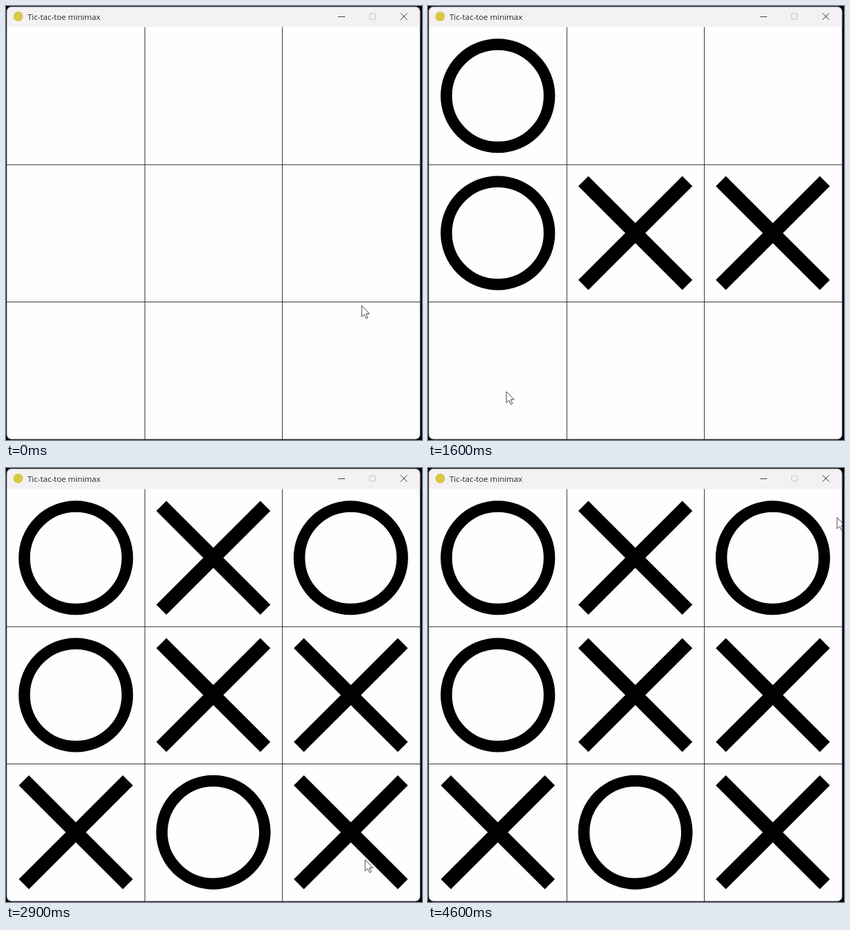
Recreate the animation shown at these times as an HTML page. Size 600x627 px, loop 4.7 s.

```html
<!DOCTYPE html>
<html lang="en">
<head>
<meta charset="utf-8">
<title>Tic-tac-toe minimax</title>
<style>
  html, body { margin: 0; width: 100%; height: 100%; overflow: hidden; background: #000; }
  svg { display: block; width: 100vw; height: 100vh; }
  text { font: 11.5px "Open Sans", "Noto Sans", sans-serif; fill: #262626; }
</style>
</head>
<body>
<svg viewBox="0 0 600 627">
  <defs>
    <clipPath id="frame"><rect x="1" y="1" width="596.3" height="625" rx="7"/></clipPath>
    <circle id="O" r="74.3" fill="none" stroke="#000" stroke-width="16.5"/>
    <path id="X" d="M-75-75 75 75M75-75-75 75" stroke="#000" stroke-width="20.5"/>
  </defs>
  <g clip-path="url(#frame)">
    <rect width="600" height="627" fill="#fefdff"/>
    <rect width="600" height="30.5" fill="#f3f1f4"/>
    <circle cx="17.5" cy="15" r="7" fill="#d9c845"/>
    <text x="31" y="19.6">Tic-tac-toe minimax</text>
    <g fill="none" stroke="#333">
      <path d="M479 15.5H489" stroke-width=".9"/>
      <rect x="524.5" y="11" width="8" height="8" rx="1" stroke="#c6c4c7"/>
      <path d="M569 10.3 578.6 19.9M578.6 10.3 569 19.9"/>
    </g>
    <g id="board"></g>
    <path id="cursor" d="M0 0V16.2L3.7 12.7 6.4 18.5 8.8 17.4 6.2 11.7H11.2Z"
          fill="#fff" stroke="#333" stroke-width=".9" stroke-linejoin="round"/>
  </g>
  <rect x="1" y="1" width="596.3" height="625" rx="7" fill="none" stroke="#555" stroke-width=".7"/>
</svg>
<script>
const LOOP = 4700, TICK = 100;
const LEFT = 2, TOP = 31, CELL = 198.3;

// Cells in playing order; X and O alternate, O answers one tick later.
const order = [4, 0, 5, 3, 6, 2, 1, 7, 8];
const clicks = [300, 1000, 1700, 2200, 2800];

// Pointer rests: arrival, departure, x, y
const rests = [
  [0, 0, 513, 433],
  [300, 400, 320, 346],
  [700, 1100, 508, 348],
  [1500, 1800, 113, 557],
  [2100, 2400, 301, 135],
  [2900, 3200, 518, 566],
  [3700, 4300, 578, 134],
  [4600, LOOP, 590, 71.5]
];

const board = document.getElementById('board');
const cursor = document.getElementById('cursor');

function add(tag, attrs) {
  const el = document.createElementNS('http://www.w3.org/2000/svg', tag);
  for (const key in attrs) el.setAttribute(key, attrs[key]);
  board.append(el);
  return el;
}

const shift = (x, y) => `translate(${x} ${y})`;
const smooth = u => u * u * (3 - 2 * u);

for (const i of [1, 2]) {
  const x = LEFT + CELL * i, y = TOP + CELL * i;
  add('path', { d: `M${x} 30.5V627M0 ${y}H600`, stroke: '#111', 'stroke-width': .85 });
}

const marks = order.map((cell, i) => {
  const x = LEFT + CELL * (cell % 3 + .498);
  const y = TOP + CELL * (Math.floor(cell / 3) + .498);
  return {
    el: add('use', { href: i % 2 ? '#O' : '#X', transform: shift(x, y) }),
    time: clicks[i >> 1] + i % 2 * TICK
  };
});

function pointerAt(t) {
  const i = rests.findLastIndex(rest => rest[0] <= t);
  const [, leave, x, y] = rests[i];
  if (t <= leave) return [x, y];
  const [arrive, , nextX, nextY] = rests[i + 1];
  const k = smooth((t - leave) / (arrive - leave));
  return [x + (nextX - x) * k, y + (nextY - y) * k];
}

function draw(now) {
  const t = Math.floor(now % LOOP / TICK) * TICK;
  for (const { el, time } of marks) el.style.display = t >= time ? '' : 'none';
  cursor.setAttribute('transform', shift(...pointerAt(t)));
}

const start = performance.now();
function loop() {
  draw(performance.now() - start);
  requestAnimationFrame(loop);
}
loop();
</script>
</body>
</html>
```
